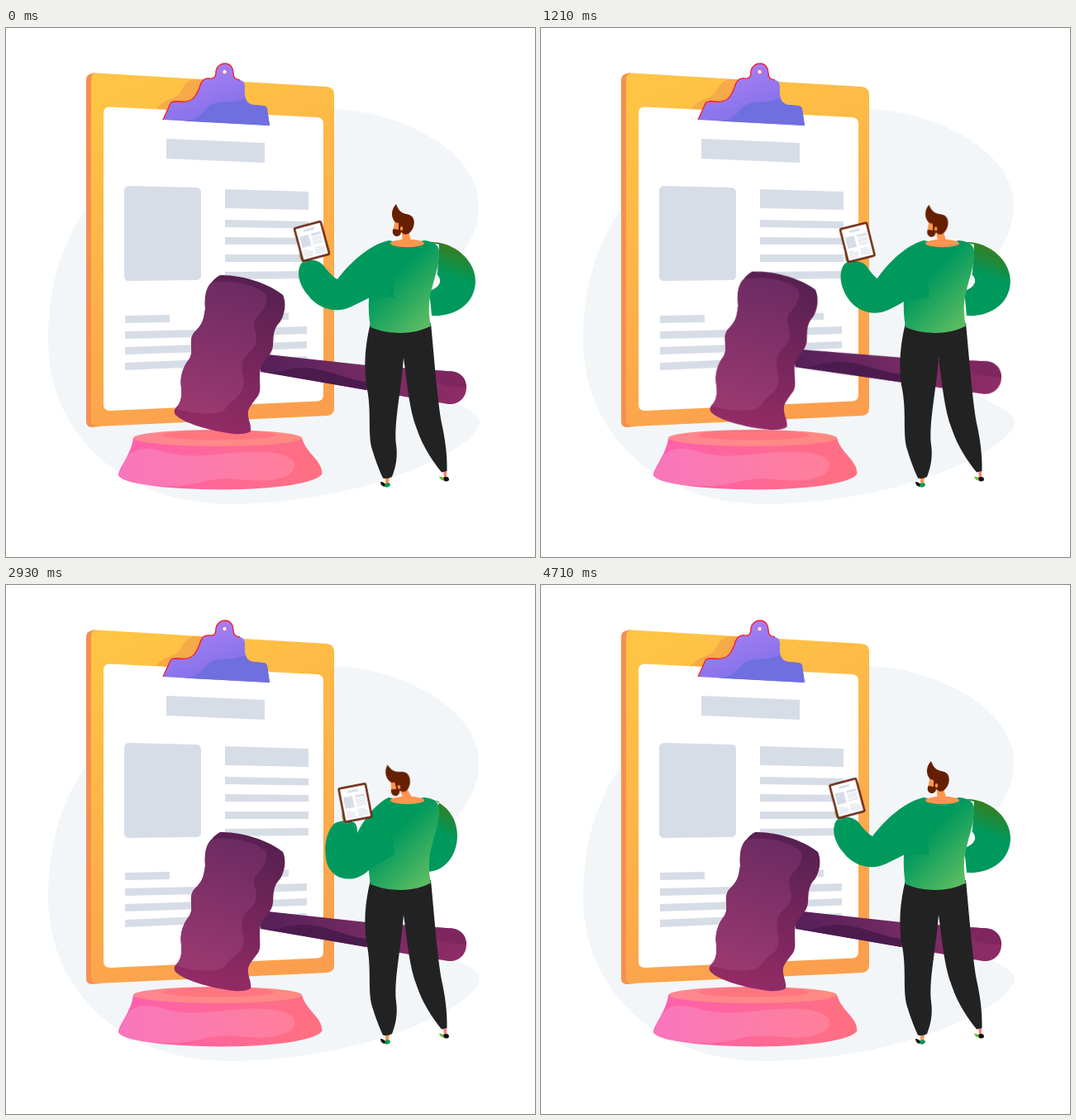
Recreate the animation shown at these times as an HTML page. Size 640 by 640 pixels, loop 4.78 s.

```html
<!DOCTYPE html>
<html lang="en">
<head>
<meta charset="utf-8">
<title>Gavel and clipboard</title>
<style>
  html, body { margin: 0; width: 100%; height: 100%; overflow: hidden; background: #fff; }
  svg { display: block; width: 100vw; height: 100vh; }

  .shake, .base, .gavel, .head, .phone, .arm, .elbow {
    animation: 4780ms cubic-bezier(.37, 0, .63, 1) infinite;
  }
  .shake { animation-name: shake; }
  .base  { animation-name: base; }
  .gavel { animation-name: gavel; transform-origin: 537px 435px; }
  .head  { animation-name: head; transform-origin: 484px 255px; }
  .phone { animation-name: phone; }
  .arm   { animation-name: arm; }
  .elbow { animation-name: elbow; }

  @keyframes shake {
    0%, 16%, 23.8%, 100% { transform: none; }
    17.4%, 18.8% { transform: translateY(-1px); }
  }
  @keyframes base {
    0%, 16%, 23.8%, 100% { transform: none; }
    17.4%, 18.8% { transform: translateY(-2.6px); }
  }

  /* lift, strike, then settle */
  @keyframes gavel {
    0% { transform: translate(0, 0) rotate(0deg); animation-timing-function: cubic-bezier(.4, 0, .4, 1); }
    10% { transform: translate(9px, -30px) rotate(49deg); animation-timing-function: cubic-bezier(.6, 0, .85, .6); }
    16.3%, 18.8% { transform: translate(0, -26px) rotate(-5.7deg); }
    31.4% { transform: translate(0, 0) rotate(2deg); }
    34.3% { transform: translate(0, 0) rotate(1.5deg); }
    40.4%, 100% { transform: translate(0, 0) rotate(0deg); }
  }

  @keyframes head {
    0%, 18.6%, 99.6%, 100% { transform: rotate(0deg); }
    39%, 47.9%, 61.3%, 75.7%, 79.3% { transform: rotate(-15deg); }
    54.6% { transform: rotate(-8deg); }
    68.4% { transform: rotate(-6deg); }
  }

  @keyframes phone {
    0%, 18.6%, 99.6%, 100% { transform: translate(370px, 258px) rotate(-15deg); }
    39%, 79.3% { transform: translate(422.5px, 263.5px) rotate(-11deg); }
  }
  @keyframes arm {
    0%, 18.6%, 99.6%, 100% {
      d: path("M463 257C440 262 415 285 401 304C395 301 390 295 383 286C375 279 362 279 357 285C350 297 356 313 366 324C378 340 400 346 418 337C426 333 434 329 440 326L470 326Z");
    }
    39%, 79.3% {
      d: path("M463 257C448 264 434 282 425 300C425 297 425 293 423 289C418 284 402 284 396 290C387 300 384 318 388 336C393 352 408 359 425 354C432 351 436 348 440 344L470 326Z");
    }
  }
  @keyframes elbow {
    0%, 24.6%, 98%, 100% {
      d: path("M512 259C540 257 568 280 568 306C568 332 545 350 515 348L512 318C520 316 526 310 525 305C525 300 520 299 522 296L524 262Z");
    }
    40.4%, 81.3% {
      d: path("M512 259C528 262 546 278 546 303C546 328 530 346 511 347L512 318C512 316 513 310 514 305C515 300 516 299 518 296L524 262Z");
    }
  }
</style>
</head>
<body>
<svg viewBox="0 0 640 640" xmlns="http://www.w3.org/2000/svg">
  <defs>
    <linearGradient id="board" x1=".3" y1="0" x2=".6" y2="1">
      <stop stop-color="#ffc444"/><stop offset="1" stop-color="#fb9f4e"/>
    </linearGradient>
    <linearGradient id="clip" x1="0" y1="0" x2=".6" y2="1">
      <stop offset=".2" stop-color="#a87ff5"/><stop offset="1" stop-color="#7a6ee6"/>
    </linearGradient>
    <linearGradient id="block">
      <stop stop-color="#ff5fae"/><stop offset="1" stop-color="#ff7080"/>
    </linearGradient>
    <linearGradient id="wave">
      <stop stop-color="#f876bd"/><stop offset="1" stop-color="#ff809a"/>
    </linearGradient>
    <linearGradient id="rim">
      <stop stop-color="#ff8692"/><stop offset="1" stop-color="#ff8a80"/>
    </linearGradient>
    <linearGradient id="handle">
      <stop stop-color="#55205a"/><stop offset=".5" stop-color="#742a62"/><stop offset="1" stop-color="#8f2c66"/>
    </linearGradient>
    <linearGradient id="side" x1=".6" y1="0" x2=".4" y2="1">
      <stop stop-color="#562050"/><stop offset="1" stop-color="#942b66"/>
    </linearGradient>
    <linearGradient id="face" x1=".6" y1="0" x2=".4" y2="1">
      <stop stop-color="#6c2b62"/><stop offset="1" stop-color="#9a3871"/>
    </linearGradient>
    <linearGradient id="shirt" gradientUnits="userSpaceOnUse" x1="466" y1="305" x2="513" y2="352">
      <stop stop-color="#00995d"/><stop offset="1" stop-color="#58bb62"/>
    </linearGradient>
    <linearGradient id="sleeve" x1=".5" y1="0" x2=".4" y2=".45">
      <stop stop-color="#3c7a18"/><stop offset="1" stop-color="#00995d"/>
    </linearGradient>
    <linearGradient id="hand" x2="0" y2="1">
      <stop stop-color="#b5bf84"/><stop offset="1" stop-color="#6b9c62"/>
    </linearGradient>
  </defs>

  <path fill="#f3f6f9" d="M397 98C470 100 572 145 572 215C572 290 480 320 480 385C480 440 573 455 573 476C573 510 430 576 270 576C140 576 51 490 51 378C51 300 75 245 104 210L200 130Z"/>

  <g class="shake">
    <path fill="#f68f51" d="M108 54L104 55Q97 56 97 63V476Q97 483 104 483L115 482Z"/>
    <path fill="url(#board)" d="M110 54.500L388 71Q397 72 397 80V460Q397 468 389 469L110 482Q103 482 103 475V62Q103 54 110 54.500Z"/>
    <path fill="#f6aa48" d="M182 98C192 84 206 88 212 76C217 66 222 62 232 62L262 64L250 102Z"/>
    <path fill="#fff" d="M126 95.500L377 108Q384 109 384 116V444Q384 451 377 451.500L126 463Q118 463 118 456V103Q118 95 126 95.500Z"/>
    <path fill="#d7dde7" d="M194 134l119 5v24l-119-5z
      M149 191l81 2q6 0 6 6v100q0 6-6 6l-81 1q-6 0-6-6v-103q0-6 6-6z
      M265 195l101 3v22l-101-2z
      M265 232l101 2v8.500l-101-1.500z M265 253l101 1v8h-101z M265 274h101v9h-101z M265 295l101-1v9l-101 1z
      M144 348l54-1v9l-54 1z M144 367l91-2v9l-91 2z M144 386l91-3v9l-91 3z M144 405l91-4v9l-91 4z
      M265 346l77-1.500v8.500l-77 1.500z M265 364l99-3v9l-99 3z M265 383l99-4v8.500l-99 4z M265 401l99-4v8.500l-99 4z"/>
    <path fill="url(#clip)" d="M190 111L199 91Q201 88 210 89C225 91 230 83 234 72C236 64 240 60 246 61C253 62 254 58 254 52C255 46 260 43 265 43C271 43 275 48 275 54C275 61 278 62 283 63C288 64 289 67 289 73C288 84 291 92 300 93L311 94Q315 94 316 98L319 118Z"/>
    <path fill="#706fe0" d="M214 112.500C238 112 238 97 250 92C264 87 276 92 289 85C291 91 294 93 300 93L311 94Q315 94 316 98L319 118Z"/>
    <path fill="none" stroke="#ff1a24" stroke-width="1.300" d="M190 111L199 91Q201 88 210 89C225 91 230 83 234 72C236 64 240 60 246 61C253 62 254 58 254 52C255 46 260 43 265 43C271 43 275 48 275 54C275 61 278 62 283 63"/>
    <circle cx="264.500" cy="53" r="2.600" fill="#fff" stroke="#ee3355" stroke-width=".6"/>
  </g>

  <g class="base">
    <path fill="url(#block)" d="M154 496C152 515 136 533 136 541C140 551 190 558 262 558.500C330 558 378 550 382.500 539C382 522 364 516 358 496Z"/>
    <path fill="url(#wave)" d="M143 527C149 508 166 507 185 511C215 520 235 518 265 515C300 510 345 512 349 527C351 543 325 551 283 546C245 542 238 553 200 554C160 554 137 546 136 541Z"/>
    <ellipse cx="256" cy="496" rx="102" ry="10" fill="url(#rim)"/>
    <ellipse cx="257" cy="492.500" rx="68" ry="6" fill="#ff7680"/>
  </g>

  <g class="gavel">
    <path fill="url(#handle)" d="M308 394L436 408L540 415.500C551 417 557 425 557 435C557 447 548 456 535 455L436 438L308 416Z"/>
    <path fill="#4b1b4d" d="M311 416C330 419 340 410 362 411C392 413 410 425 436 428L436 438Z"/>
    <path fill="#7f2660" d="M508 413.500L540 415.500C551 417 557 425 557 435C543 434 528 434 521 427Q518 418 508 413.500Z"/>
    <path fill="url(#side)" d="M259 299C285 298 320 310 335 323C339 332 338 345 332 355C322 365 324 375 323 384C322 397 310 402 308 412C305 425 310 437 305 445C300 452 294 458 293 464C292 474 297 478 296 488Q290 492 275 491C245 487 215 478 205 468Q202 464 205 460C212 454 213 445 212 435C210 422 214 410 222 400C228 390 220 380 227 369C240 357 239 350 241 340C240 325 243 308 259 299Z"/>
    <path fill="url(#face)" d="M248 308C275 304 303 311 315 323C317 337 308 344 302 352C296 362 306 370 302 382C298 391 288 395 286 406C284 418 290 428 286 438C282 448 270 451 265 461C257 470 225 467 205 460C212 454 213 445 212 435C210 422 214 410 222 400C228 390 220 380 227 369C240 357 239 350 241 340C240 325 241 316 248 308Z"/>
  </g>

  <g class="shake">
    <path fill="#ff9550" d="M459 543h5l-1 8h-4z"/>
    <path fill="#f77f78" d="M529 535h4v9h-3z"/>
    <path fill="#111" d="M453 549Q457 549 460 553L458 555Q453 554 453 549ZM529 544Q536 541 536 547Q533 550 529 547Z"/>
    <path fill="#079a5a" d="M459 551Q465 549 465 553Q463 557 458 555Z"/>
    <path fill="#6cc22d" d="M524 543Q529 542 530 547Q526 548 524 543Z"/>
    <path fill="#222" d="M441 357C434 385 433 408 436 432C443 463 437 490 443 510C448 526 452 536 456 544.500Q462 546 467 543C472 530 474 518 472 504C469 478 478 440 481 399C486 435 488 462 497 485C504 506 516 524 527 537.500L533.500 536C534 515 531 496 527 478C522 450 519 410 514 357Z"/>
    <path class="elbow" fill="url(#sleeve)" d="M512 259C540 257 568 280 568 306C568 332 545 350 515 348L512 318C520 316 526 310 525 305C525 300 520 299 522 296L524 262Z"/>
    <path fill="url(#shirt)" d="M463 257Q485 263 506 257C516 258 523 261 524 270C525 290 515 308 512 332Q511 347 514 360.500C492 372 463 371 441 362Q438 345 439 326L450 268Z"/>
    <path class="arm" fill="#00995d" d="M463 257C440 262 415 285 401 304C395 301 390 295 383 286C375 279 362 279 357 285C350 297 356 313 366 324C378 340 400 346 418 337C426 333 434 329 440 326L470 326Z"/>
    <ellipse cx="485.500" cy="260.500" rx="20.500" ry="4.700" fill="#ff9550"/>

    <g class="head">
      <path fill="#ff9550" d="M471 232L468.500 243L471 250L479 248L479.500 257Q485 261 490 257L487 246L481 234Z"/>
      <path fill="#661f00" d="M472 213C466 219 465 229 471 235L475 236L475 244L468.500 243C466 249 470 252.500 474 252C477 251 478 249 478 246C481 251 485 250 488 248C493 244 495 236 493 231C491 225 485 226 481 224C476 222 474 218 472 213Z"/>
      <ellipse cx="478.500" cy="242.500" rx="1.700" ry="2.600" fill="#ff9550"/>
    </g>

    <g class="phone">
      <ellipse cx="-14.500" cy="14.500" rx="4.700" ry="8.500" fill="url(#hand)"/>
      <rect x="-16.500" y="-20.500" width="33" height="41" rx="1.500" fill="#fff" stroke="#66210c" stroke-width="2.400"/>
      <path fill="#d7dde7" d="M-6.500-16h13v2.700h-13zM-13-9h11v14h-11zM1-9h12v2.700h-12z"/>
      <path stroke="#d3d9e4" d="M1-4h12M1-1.500h12M1 1h12M1 3.500h12M-13 9h6M-13 11.300h11M-13 13.600h11M-13 15.900h11M1 9h9M1 11.300h12M1 13.600h12M1 15.900h12"/>
    </g>
  </g>
</svg>
</body>
</html>
```
